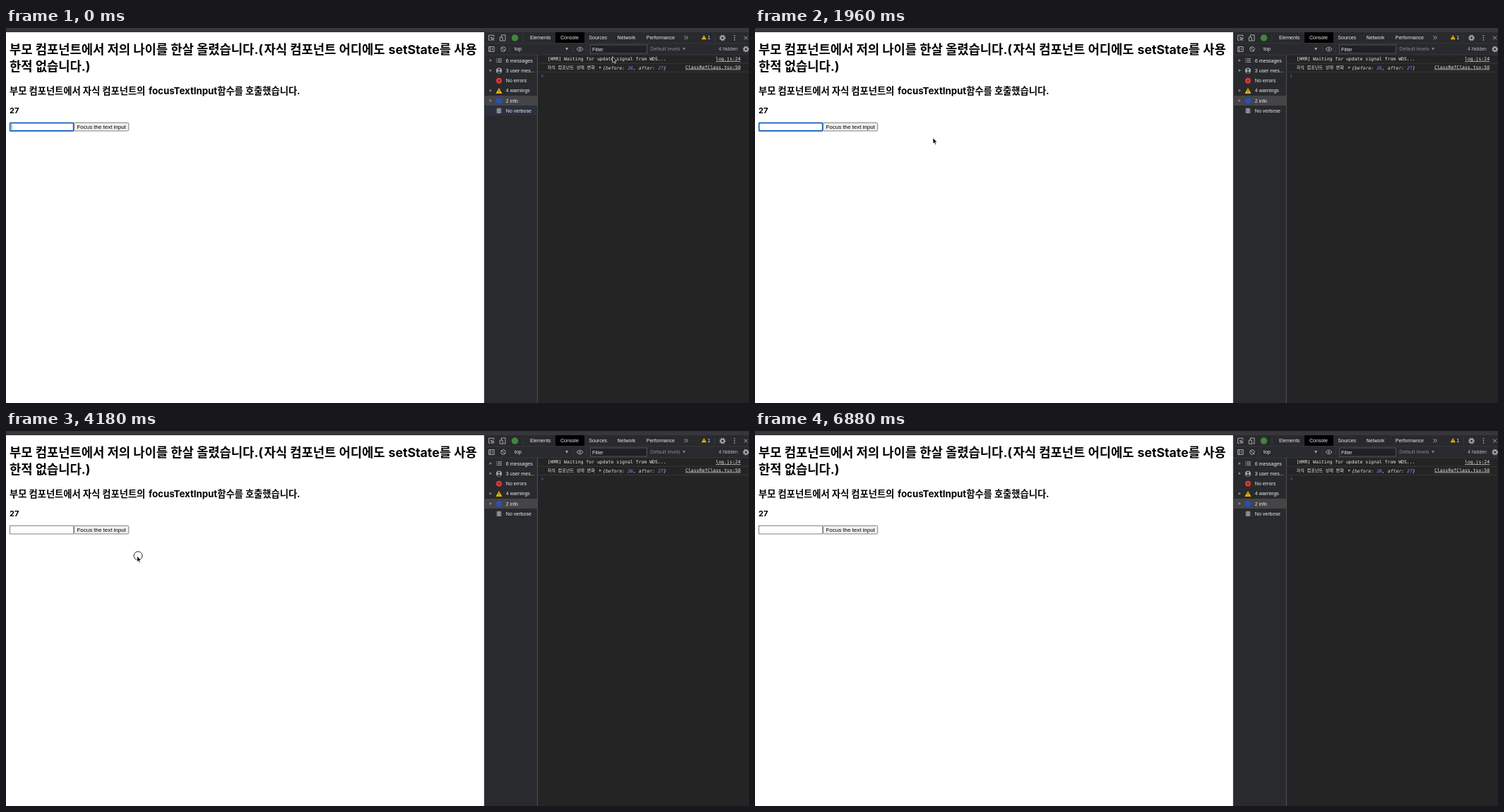
An HTML page for the animation above (6.98 s loop, 1052 px wide and 532 px high).

```html
<!DOCTYPE html>
<html lang="ko">
<head>
<meta charset="utf-8">
<title>Console and page</title>
<style>
html, body { margin: 0; width: 100%; height: 100%; overflow: hidden; background: #fff; }
svg { display: block; width: 100vw; height: 100vh; }
text { white-space: pre; }
.page { font-family: Inter, "Noto Sans CJK KR", "Noto Sans CJK", sans-serif; font-weight: 700; fill: #000; }
.h1 { font-size: 17.7px; }
.h2 { font-size: 13.26px; }
.h3 { font-size: 11px; }
.ui { font: 7.05px "Liberation Sans", Arial, sans-serif; fill: #e8eaed; }
.mono { font: 6.49px "DejaVu Sans Mono", "Noto Sans CJK KR", "Noto Sans CJK", monospace; fill: #e8e8e8; }
.ko { font-size: 6.1px; }
.link { text-decoration: underline; }
.obj { font-style: italic; fill: #d5dae0; }
.num { fill: #9980ff; }
.dim { fill: #80868b; }
.line { fill: none; stroke: #a5a9ad; stroke-width: 1; }
.sep { stroke: #3f4043; stroke-width: .7; }
</style>
</head>
<body>
<svg viewBox="0 0 1052 532">
  <defs>
    <g id="gear" fill="none" stroke="#a5a9ad">
      <circle r="2.4" stroke-width="1.7"/>
      <circle r="3.7" stroke-width="1.4" stroke-dasharray="1.65 1.256"/>
    </g>
    <g id="warn">
      <path d="M0-4.2 4.4 3.7H-4.4Z" fill="#fbbc04"/>
      <path d="M0-1.6V1M0 1.8V2.8" stroke="#292a2d" stroke-width=".9"/>
    </g>
  </defs>

  <rect width="1052" height="532" fill="#fff"/>
  <rect width="1052" height="6" fill="#37363b"/>

  <g id="content">
    <g class="page">
      <g class="h1">
        <text x="5" y="36.7">부모 컴포넌트에서 저의 나이를 한살 올렸습니다.(</text>
        <text x="365.5" y="36.7">자식 컴포넌트 어디에도</text>
        <text x="541.5" y="36.7">setState를 사용</text>
        <text x="5" y="61">한적 없습니다.)</text>
      </g>
      <g class="h2">
        <text x="5" y="93.6">부모 컴포넌트에서 자식 컴포넌트의</text>
        <text x="202" y="93.6">focusTextInput함수를 호출했습니다.</text>
      </g>
      <text class="h3" x="5" y="120.5">27</text>
    </g>
    <rect x="5.5" y="134.4" width="90.2" height="11.6" fill="#fff" stroke="#767676" stroke-width=".9"/>
    <rect id="ring" x="5.7" y="134.7" width="89.9" height="11.2" rx="1" fill="#fff" stroke="#1662bd" stroke-width="1.7"/>
    <path id="caret" d="M8 136.2V144.6" stroke="#445b80" stroke-width=".8"/>
    <rect x="96.5" y="134.4" width="77.2" height="11.6" rx="1.5" fill="#efefef" stroke="#767676" stroke-width=".9"/>
    <text x="100.5" y="143" style="font:7.95px 'Liberation Sans',Arial,sans-serif">Focus the text input</text>
  </g>

  <!-- developer panel -->
  <rect x="677" y="6" width="375" height="526" fill="#242424"/>
  <rect x="677" y="6" width="375" height="32" fill="#292a2d"/>
  <rect x="677" y="38" width="75" height="494" fill="#292a2d"/>
  <path class="sep" d="M677 21.8H1052M677 38H1052M732 9V19M1003 9V19M713 25V35M803 25V35M822 25V35"/>
  <path d="M752.4 38V532" stroke="#56575a" stroke-width=".9"/>
  <path d="M677.3 6V532" stroke="#4a4b4e" stroke-width=".7"/>
  <rect x="778" y="6" width="41" height="15" fill="#000"/>
  <rect x="678" y="96" width="74" height="14" fill="#454547"/>
  <rect id="hover" x="678" y="110.3" width="74" height="14" fill="#2b303d"/>

  <g class="ui">
    <text x="742" y="16.2">Elements</text>
    <text x="785" y="16.2">Console</text>
    <text x="825.3" y="16.2">Sources</text>
    <text x="865.5" y="16.2">Network</text>
    <text x="906.7" y="16.2">Performance</text>
    <text x="720" y="32.3">top</text>
    <g id="badge">
      <use href="#warn" transform="translate(988.2 13.4) scale(.78)"/>
      <text x="993.2" y="16.2">1</text>
    </g>
    <rect id="filter" x="827.4" y="24" width="80" height="12" fill="#202124" stroke="#56585c" stroke-width=".9"/>
    <text x="830" y="32.5">Filter</text>
    <g id="levels" class="dim">
      <text x="912.3" y="32.3">Default levels</text>
      <path d="M958 28H962L960 31.7Z"/>
    </g>
    <text id="hidden" x="1009" y="32.3" fill="#b3b7bb"></text>
    <g id="rows"></g>
  </g>

  <g class="line">
    <path d="M686 17.3H683.6V10.2H690.8V12.5M686.4 13 691.3 14.8 689 15.5 688.2 17.8ZM689 15.5 691.4 18"/>
    <path d="M701.4 13V9.9H707V18H703.8M699.3 13H703.2V18.2H699.3Z"/>
    <path d="M960.6 11.2 962.6 13.7 960.6 16.2M963.4 11.2 965.4 13.7 963.4 16.2"/>
    <path d="M1045 11.5 1050 16.5M1050 11.5 1045 16.5"/>
    <path d="M683.6 26.6H691.2V33.4H683.6ZM685.7 26.6V33.4M689.6 28.4 687.8 30 689.6 31.6"/>
    <circle cx="704" cy="30" r="3.3"/><path d="M701.7 27.7 706.3 32.3"/>
    <path d="M808 30Q812.5 24.2 817 30Q812.5 35.8 808 30Z"/>
    <circle cx="812.5" cy="30" r="1.1"/>
  </g>
  <g fill="#a5a9ad">
    <path d="M792 28H796.2L794.1 31.8Z"/>
    <circle cx="1031.5" cy="10.8" r=".9"/><circle cx="1031.5" cy="13.8" r=".9"/><circle cx="1031.5" cy="16.8" r=".9"/>
  </g>
  <circle cx="720.5" cy="14" r="4.7" fill="#43853d"/>
  <use href="#gear" x="1014.5" y="14"/>
  <use href="#gear" x="1047.7" y="30"/>

  <!-- sidebar icons -->
  <g id="arrows" fill="#85888c"></g>
  <path class="line" d="M694 43.8H695M696 43.8H702M694 46.1H695M696 46.1H702M694 48.4H695M696 48.4H702"/>
  <circle cx="698" cy="60.4" r="4" fill="#a5a9ad"/>
  <circle cx="698" cy="59" r="1.4" fill="#292a2d"/>
  <path d="M695.5 62.9Q698 60 700.5 62.9Q698 65 695.5 62.9Z" fill="#292a2d"/>
  <circle cx="698" cy="74.7" r="4" fill="#e53935"/>
  <path d="M696.5 73.2 699.5 76.2M699.5 73.2 696.5 76.2" stroke="#292a2d" stroke-width=".9"/>
  <use href="#warn" x="698" y="89.2"/>
  <circle cx="698" cy="103.2" r="4" fill="#2450d1"/>
  <path d="M698 100.8V101.7M698 102.5V105.6" stroke="#454547" stroke-width=".8"/>
  <ellipse cx="698" cy="117.5" rx="2.2" ry="3.6" fill="#a5a9ad"/>
  <path class="line" stroke-width=".8" d="M694.3 115.2H701.7M694.3 117.6H701.7M694.3 120H701.7M696 113.3 697 114.3M700 113.3 699 114.3"/>
  <path d="M697 116.5H699M697 118.7H699" stroke="#292a2d" stroke-width=".7"/>

  <g id="log" class="mono">
    <path class="sep" d="M753 50.2H1052M753 62.3H1052"/>
    <text x="766.7" y="46.2">[HMR] Waiting for update signal from WDS...</text>
    <text class="link" x="1005" y="46.2">log.js:24</text>
    <text class="ko" x="766.7" y="58.4">자식 컴포넌트 상태 변화</text>
    <path d="M840 54.2 843.2 56 840 57.8Z" fill="#9aa0a6"/>
    <text class="obj" x="845" y="58.6">{before: <tspan class="num">26</tspan>, after: <tspan class="num">27</tspan>}</text>
    <text class="link" x="962" y="57.6">ClassRefClass.tsx:50</text>
  </g>
  <path id="prompt" d="M-1.2-2 1.2 0-1.2 2" fill="none" stroke="#367cf1" stroke-width=".9"/>

  <g id="dock">
    <circle cx="856" cy="529.5" r="9.2" fill="#7fc8d8"/>
    <circle cx="872" cy="525" r="6" fill="#f23b2f"/>
    <text x="872" y="527.4" text-anchor="middle" fill="#fff" style="font:6.5px 'Liberation Sans',Arial,sans-serif">N</text>
  </g>

  <circle id="click" cx="187" cy="177" r="6" fill="#fff" stroke="#222" stroke-width="1"/>
  <g id="pointer">
    <path id="arrow" d="M0 0V8.4L1.9 6.7 3.2 9.7 4.6 9.1 3.3 6.2H5.8Z" fill="#000" stroke="#fff" stroke-width=".7"/>
    <path id="beam" d="M-1.5-4.2Q0-4.2 0-3V3Q0 4.2-1.5 4.2M1.5-4.2Q0-4.2 0-3V3Q0 4.2 1.5 4.2" fill="none" stroke="#222" stroke-width=".8"/>
  </g>
</svg>
<script>
const LOOP = 6980;
const $ = id => document.getElementById(id);
const show = (id, on) => { $(id).style.display = on ? '' : 'none'; };
const move = (id, x, y) => $(id).setAttribute('transform', `translate(${x} ${y})`);

const rowY = i => 46.1 + i * 14.24;
$('rows').innerHTML = [0, 1, 2, 3, 4, 5].map(i => `<text x="707.8" y="${rowY(i) + 2.5}"></text>`).join('');
$('arrows').innerHTML = [0, 1, 3, 4].map(i => `<path d="M684.7 ${rowY(i) - 2}L688 ${rowY(i)} 684.7 ${rowY(i) + 2}Z"/>`).join('');

const views = {
  full: { hidden: '4 hidden', rows: ['6 messages', '3 user mes...', 'No errors', '4 warnings', '2 info', 'No verbose'] },
  loading: { hidden: '1 hidden', rows: ['2 messages', '1 user mes...', 'No errors', '1 warning', '1 info', 'No verbose'] },
  blank: { hidden: '', rows: ['No messages', 'No user me...', 'No errors', 'No warnings', 'No info', 'No verbose'] }
};

const ticks = [[0, 1070, 8], [1220, 2250, 8], [2550, 3590, 8], [3730, 4630, 7],
  [4780, 5810, 8], [5960, 6250, 3], [6880, 6880, 1]].flatMap(([a, b, n]) =>
  Array.from({ length: n }, (_, i) => Math.round(a + (b - a) * i / Math.max(1, n - 1))));

// Pointer path: time, x, y
const path = [[0, 858.7, 40.5], [150, 845, 46], [600, 560, 120], [910, 365, 188], [1220, 340, 179.8],
  [1800, 270, 160], [2250, 218, 148], [2550, 214, 143.6], [2850, 150, 140], [3140, 94, 139.5],
  [3590, 104, 151], [4180, 185.6, 177.3], [4330, 185.6, 177.3], [4630, 150, 142], [4780, 150, 143],
  [5000, 320, 250], [5220, 530, 258], [5370, 645, 130], [5510, 610, 52], [5660, 573.7, 165],
  [5810, 576, 166], [5960, 660, 270], [6110, 931, 478]];

// Input focus spans: from, to
const focusSpans = [[0, 910], [1360, 2250], [2700, 4180], [4780, 6880]];

function pointerAt(t) {
  const i = path.findIndex(p => p[0] > t);
  if (i < 0) return path[path.length - 1].slice(1);
  const [t0, x0, y0] = path[i - 1], [t1, x1, y1] = path[i];
  const k = (t - t0) / (t1 - t0);
  return [x0 + (x1 - x0) * k, y0 + (y1 - y0) * k];
}

function viewAt(t) {
  if (t >= 1220 && t < 1360) return 'loading';
  if (t >= 2250 && t < 2690) return 'blank';
  return 'full';
}

function drawPanel(name) {
  const { rows, hidden } = views[name], blank = name === 'blank', full = name === 'full';
  rows.forEach((s, i) => { $('rows').children[i].textContent = s; });
  $('hidden').textContent = hidden;
  $('filter').setAttribute('width', blank ? 86.7 : 80);
  move('levels', blank ? 7 : 0, 0);
  show('content', !blank);
  show('badge', !blank);
  show('arrows', !blank);
  show('log', full);
  move('prompt', 759.3, full ? 68 : 44);
}

let lastView, lastTick;
function draw(t) {
  if (t === lastTick) return;
  lastTick = t;
  const view = viewAt(t);
  if (view !== lastView) drawPanel(lastView = view);

  const span = focusSpans.find(([a, b]) => t >= a - 10 && t < b);
  show('ring', span);
  show('caret', span && Math.floor(Math.max(0, t - span[0]) / 485) % 2 === 0);
  show('hover', t < 150);

  const [x, y] = pointerAt(t);
  const overInput = x > 5 && x < 96 && y > 134 && y < 147;
  show('pointer', t < 6250);
  show('arrow', !overInput);
  show('beam', overInput);
  move('pointer', x, y);
  show('click', t >= 4180 && t < 4330);

  // The icon bounces once from below the edge
  show('dock', t >= 1070 && t < 2000);
  move('dock', 0, 1.03e-4 * ((t - 1500) ** 2 - 280 ** 2));
}

const start = performance.now();
function loop() {
  const t = (performance.now() - start) % LOOP;
  draw(ticks.filter(k => k <= t).pop());
  requestAnimationFrame(loop);
}
loop();
</script>
</body>
</html>
```
